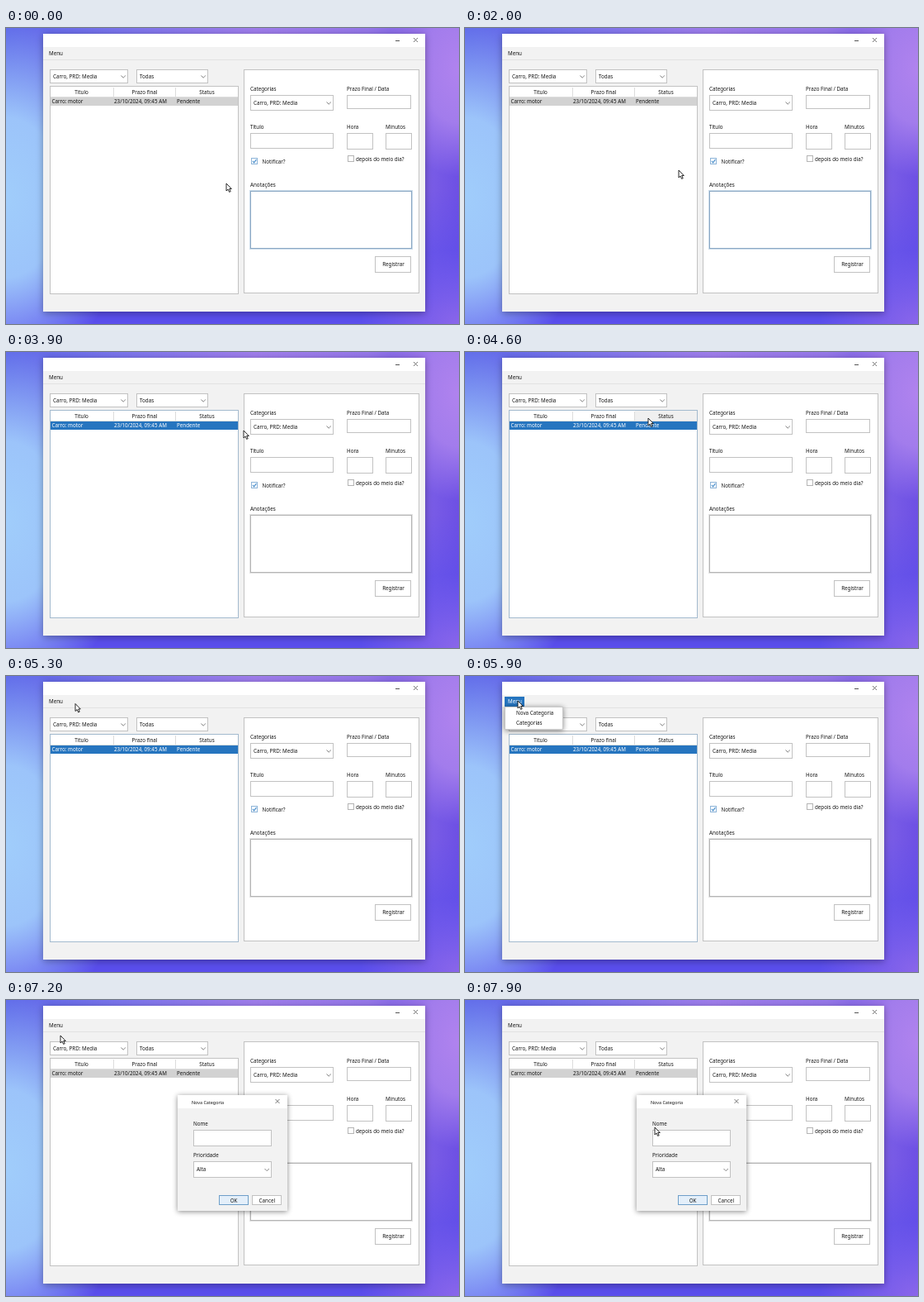
These frames come from a looping animation (549x358 px, 8 s). An HTML page:

```html
<!DOCTYPE html>
<html lang="pt">
<head>
<meta charset="utf-8">
<title>Tarefas</title>
<style>
html, body { margin: 0; width: 100%; height: 100%; overflow: hidden; }
svg {
  display: block; width: 549px; height: 358px;
  background:
    radial-gradient(ellipse 150px 215px at 0 205px, #a0cdfb 0, #9cc4fa 45%, #9cc0fa00 100%),
    radial-gradient(ellipse 90px 130px at 549px 50px, #b083ee 0, #a27cec 50%, #a27cec00 100%),
    radial-gradient(ellipse 120px 90px at 549px 358px, #8a66ea 0, #8a66ea00 100%),
    linear-gradient(180deg, #5f66e800 0, #5f66e800 55%, #5a4eec 92%),
    linear-gradient(90deg, #5c66e8 0, #7a74ec 25%, #9f7dec 55%, #9577ea 80%, #6d50e4 100%);
}
text { font: 500 6.25px "Noto Sans", "Open Sans", sans-serif; fill: #151515; white-space: pre; }
.mid { text-anchor: middle; }
.small { font-size: 5.4px; font-weight: 400; }
rect { shape-rendering: crispEdges; }
.arrow { fill: none; stroke: #777; stroke-width: .9; }
.arrow.hover { stroke: #b0b0b0; }
.shadow { filter: drop-shadow(0 1px 3px #0007); }
.win { filter: drop-shadow(0 2px 4px #0005); }
</style>
</head>
<body>
<svg id="stage" viewBox="0 0 549 358"></svg>
<script>
const LOOP = 8000, STEP = 100;
const BLUE = '#2675bf', GREY = '#d2d2d2', LINE = '#c2c2c2', PANEL = '#f2f2f2';

const fill = (x, y, w, h, color, attrs = '') =>
  `<rect x="${x}" y="${y}" width="${w}" height="${h}" fill="${color}" ${attrs}/>`;
const box = (x, y, r, b, stroke = LINE, bg = '#fff', attrs = '') =>
  fill(x + .5, y + .5, r - x - 1, b - y - 1, bg, `stroke="${stroke}" ${attrs}`);
const label = (x, cy, str, cls = '', attrs = '') =>
  `<text x="${x}" y="${cy + 2.3}" class="${cls}" ${attrs}>${str}</text>`;
const cross = (x, y) =>
  `<path d="M${x - 2.5} ${y - 2.5}l5 5m0-5l-5 5" stroke="#555" stroke-width=".8"/>`;
const combo = (id, x, y, r, b, str) => box(x, y, r, b) + label(x + 4, (y + b) / 2, str) +
  `<path id="${id}" class="arrow" d="M${r - 8.5} ${(y + b) / 2 - 1}l2.7 2.7 2.7-2.7"/>`;
const group = (id, body, cls = '') => `<g id="${id}" class="${cls}">${body}</g>`;

const frameWindow =
  group('win', fill(45, 7, 463, 336, PANEL), 'win') +
  fill(45, 7, 463, 16, '#fff') +
  fill(472, 15, 5, 1, '#555') + cross(496.5, 14.5) +
  fill(45, 38, 463, 1, '#e2e2e2') +
  fill(48, 25, 24, 12, 'none', 'id="menuBg"') +
  label(52, 31, 'Menu', '', 'id="menuText"');

const table =
  combo('arrowA', 53, 50, 148, 67, 'Carro, PRD: Media') +
  combo('arrowB', 158, 50, 245, 67, 'Todas') +
  box(53, 70, 282, 322, LINE, '#fff', 'id="tableBox"') +
  fill(130, 71, 75, 13, '#fff', 'id="headB"') +
  fill(206, 71, 75, 13, '#fff', 'id="headC"') +
  fill(54, 83, 227, 1, '#dedede') +
  fill(130, 72, 1, 11, '#dcdcdc') + fill(205, 72, 1, 11, '#dcdcdc') +
  label(91.5, 77.3, 'Título', 'mid') + label(168, 77.3, 'Prazo final', 'mid') +
  label(243.5, 77.3, 'Status', 'mid') +
  fill(54, 84, 227, 10, GREY, 'id="row"') +
  group('rowText', label(55.5, 89, 'Carro: motor') +
    label(131, 89, '23/10/2024, 09:45 AM') + label(207, 89, 'Pendente'));

const form =
  box(288, 50, 501, 321) +
  label(296, 74, 'Categorias') + label(413, 74, 'Prazo Final / Data') +
  combo('arrowC', 296, 81, 397, 100, 'Carro, PRD: Media') + box(413, 81, 491, 98) +
  label(296, 120, 'Título') + label(413, 120, 'Hora') + label(460, 120, 'Minutos') +
  box(296, 127, 397, 146) + box(413, 127, 445, 147) + box(460, 127, 492, 147) +
  box(297, 157, 305, 165, '#8fb5d8', '#f5faff') +
  '<path d="M299 161l1.6 1.8 2.8-3.8" fill="none" stroke="#3f87c6" stroke-width="1.1"/>' +
  label(310.5, 161.3, 'Notificar?') +
  box(414, 154, 422, 162, '#b5b5b5') + label(424, 158.3, 'depois do meio dia?') +
  label(296, 189.3, 'Anotações') +
  box(295, 196, 493, 268, '#e2e2e2', '#fff', 'id="notesGlow"') +
  box(296, 197, 492, 267, '#b4b4b4', '#fff', 'id="notesBox"') +
  fill(297, 198, 1, 9, '#222', 'id="caret"') +
  box(447, 276, 491, 296) + label(469.5, 286, 'Registrar', 'mid');

const popup = group('popup',
  group('popupBox', box(48, 37, 119, 65, '#c8c8c8'), 'shadow') +
  fill(48, 39, 71, 12, 'none', 'id="itemA"') + fill(48, 51, 71, 12, 'none', 'id="itemB"') +
  label(62, 45, 'Nova Categoria', '', 'id="itemAText"') +
  label(62, 57, 'Categorias', '', 'id="itemBText"'));

const dialog = group('dialog',
  group('dialogBox', fill(208, 115, 133, 140, PANEL), 'shadow') +
  fill(208, 115, 133, 16, '#fff') + label(225, 123.3, 'Nova Categoria', 'small') +
  cross(329, 122.5) +
  label(227, 149.5, 'Nome') + box(227, 157, 322, 177) +
  label(227, 187.5, 'Prioridade') + combo('arrowD', 227, 195, 322, 215, 'Alta') +
  box(258, 236, 294, 248, '#6f9fc9', '#e4effa') + label(276, 242.2, 'OK', 'mid') +
  box(298, 236, 334, 248) + label(316.3, 242.2, 'Cancel', 'mid'));

const pointer = '<path id="pointer" d="M0 0v9l2.1-1.9 1.5 3.3 1.6-.7-1.5-3.2H6.3z" ' +
  'fill="#fff" stroke="#111" stroke-width=".9" stroke-linejoin="round"/>';

const stage = document.getElementById('stage');
stage.innerHTML = frameWindow + table + form + popup + dialog + pointer;
const $ = Object.fromEntries([...stage.querySelectorAll('[id]')].map(e => [e.id, e]));

// Pointer path: time, x, y
const path = [
  [0, 267, 188], [1900, 267, 188], [2000, 259, 172], [2200, 214, 127], [2300, 197, 112],
  [2800, 197, 112], [2900, 194, 88], [3600, 194, 88], [3700, 210, 90], [3900, 288, 95],
  [4000, 312, 94], [4100, 320, 92], [4200, 314, 91], [4500, 240, 86], [4600, 222, 80],
  [4900, 164, 61], [5200, 96, 38], [5400, 72, 29], [5500, 72, 29], [5600, 67, 29],
  [5700, 64, 30], [6100, 64, 30], [6200, 65, 58], [6300, 67, 130], [6400, 66, 43],
  [7300, 66, 43], [7400, 80, 53], [7700, 192, 128], [7900, 230, 154], [LOOP, 230, 154]
];

function pointerAt(t) {
  const i = path.findIndex(p => p[0] > t);
  const [t0, x0, y0] = path[i - 1], [t1, x1, y1] = path[i];
  const k = (t - t0) / (t1 - t0);
  return [x0 + (x1 - x0) * k, y0 + (y1 - y0) * k];
}

const paint = (el, color) => el.setAttribute('fill', color);
const show = (el, on) => { el.style.display = on ? '' : 'none'; };
const ink = (el, light) => { el.style.fill = light ? '#fff' : ''; };

function draw(time) {
  const t = Math.floor(time % LOOP / STEP) * STEP;
  const during = (a, b) => t >= a && t < b;
  const [x, y] = pointerAt(t);
  const over = (l, top, r, b) => x >= l && x < r && y >= top && y < b;

  $.pointer.setAttribute('transform', `translate(${x} ${y})`);
  show($.caret, during(200, 1000) || during(1300, 2000) || during(2300, 2900));

  const notes = t < 3100, active = during(3100, 7200);
  $.notesBox.setAttribute('stroke', notes ? '#8ba8c4' : '#b4b4b4');
  $.notesGlow.setAttribute('stroke', notes ? '#cbdcea' : '#e2e2e2');
  $.tableBox.setAttribute('stroke', active ? '#a3bace' : LINE);
  paint($.row, active ? BLUE : GREY);
  for (const el of $.rowText.children) ink(el, active);

  paint($.headB, over(130, 71, 205, 84) ? '#f0f0f0' : '#fff');
  paint($.headC, over(205, 71, 282, 84) ? '#f0f0f0' : '#fff');
  $.arrowA.classList.toggle('hover', over(53, 50, 148, 67) && t < 5900);
  $.arrowB.classList.toggle('hover', over(158, 50, 245, 67));
  $.arrowC.classList.toggle('hover', over(296, 81, 397, 100));

  const open = during(5900, 7100);
  paint($.menuBg, open ? BLUE : during(5600, 5900) ? '#dedede' : 'none');
  ink($.menuText, open);
  show($.popup, during(5900, 7200));
  const first = t >= 6400, second = during(6200, 6400);
  paint($.itemA, first ? BLUE : 'none');
  paint($.itemB, second ? BLUE : 'none');
  ink($.itemAText, first);
  ink($.itemBText, second);
  show($.dialog, t >= 7200);
}

const start = performance.now();
function tick() {
  draw(performance.now() - start);
  requestAnimationFrame(tick);
}
tick();
</script>
</body>
</html>
```
